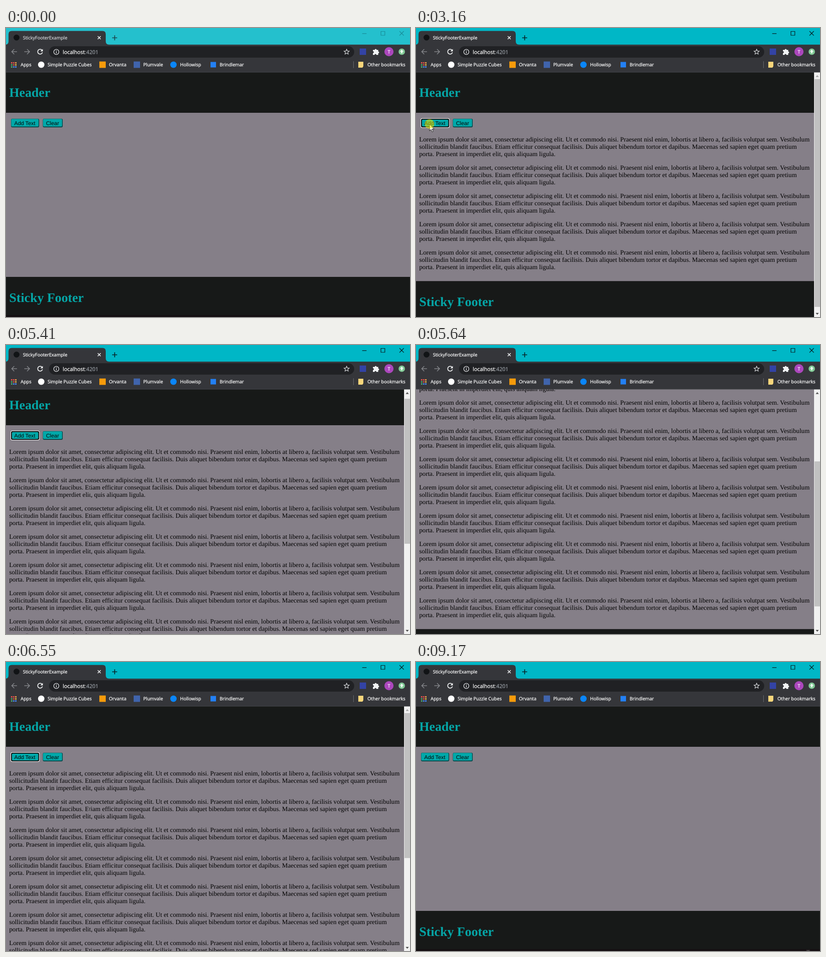
Write an HTML page that moves like this. It is 883 by 634 pixels and loops after 9.26 s.

```html
<!DOCTYPE html>
<html lang="en">
<head>
<meta charset="utf-8">
<title>Sticky footer demo</title>
<style>
  html, body { margin: 0; width: 100%; height: 100%; overflow: hidden; background: #171918; }
  svg { display: block; width: 883px; height: 634px; }
  text { text-rendering: geometricPrecision; white-space: pre; }
  .ui { font-family: "Open Sans", "Noto Sans", sans-serif; font-size: 10.1px; color: #fff; }
  .ui, .ui tspan { fill: currentColor; stroke: currentColor; stroke-width: .25; }
  .body { font: 14.2px "Liberation Serif", "Times New Roman", serif; fill: #000; }
  .title { font: bold 28.35px "Liberation Serif", "Times New Roman", serif; fill: #05a5a6; }
  .label { font: 11.9px "Liberation Sans", Arial, sans-serif; fill: #060909; }
  .line { fill: none; stroke-width: 1.6; }
</style>
</head>
<body>
<svg viewBox="0 0 883 634">
  <defs>
    <clipPath id="view"><rect y="97" width="883" height="537"/></clipPath>
    <g id="para" class="body">
      <text x="7" y="249">Lorem ipsum dolor sit amet, consectetur adipiscing elit. Ut et commodo nisi. Praesent nisl enim, lobortis at libero a, facilisis volutpat sem. Vestibulum</text>
      <text x="7" y="265">sollicitudin blandit faucibus. Etiam efficitur consequat facilisis. Duis aliquet bibendum tortor et dapibus. Maecenas sed sapien eget quam pretium</text>
      <text x="7" y="281">porta. Praesent in imperdiet elit, quis aliquam ligula.</text>
    </g>
  </defs>

  <g clip-path="url(#view)">
    <rect y="97" width="883" height="537" fill="#150f12"/>
    <g id="page">
      <rect y="97" width="883" height="89" fill="#171918"/>
      <text class="title" x="7" y="151">Header</text>
      <rect id="main" y="186" width="883" fill="#857f88"/>
      <g id="buttons"></g>
      <g id="paras"></g>
      <g id="footer">
        <rect width="883" height="84" fill="#171918"/>
        <text class="title" x="7" y="54.5">Sticky Footer</text>
      </g>
    </g>
    <g id="scrollbar">
      <rect x="870" y="97" width="13" height="537" fill="#f1f1f1"/>
      <rect id="thumb" x="871" width="12" fill="#c1c1c1"/>
      <path id="up" d="M873.5 107.5l3.5-4 3.5 4z"/>
      <path id="down" d="M873.5 625l3.5 4 3.5-4z"/>
    </g>
  </g>

  <rect id="titlebar" width="883" height="37"/>
  <path id="controls" fill="none" stroke-width="1.2" d="M778.5 12.3h9.500M819.5 7.500h8.500v8.500h-8.500zM860 7l9.500 9.500M869.500 7l-9.500 9.500"/>
  <path id="plus" class="line" d="M232 21.5h11M237.5 16v11"/>
  <path d="M0 36.500Q5.500 36 5.500 29V13.500Q5.500 6.500 12.500 6.500H211Q218 6.500 218 13.500V29Q218 36 224 36.500V97H0z" fill="#35363a"/>
  <rect y="36.500" width="883" height="60.500" fill="#35363a"/>
  <rect y="96.500" width="883" height="1" fill="#47484c"/>
  <circle cx="23" cy="21" r="6.500" fill="#111416"/>
  <text class="ui" id="tabname" x="37" y="25" style="font-size:10px">StickyFooterExample</text>
  <path class="line" d="M200.500 18l6.500 6.500M207 18l-6.500 6.500" stroke="#f1f3f4"/>

  <g class="line" stroke="#85878b">
    <path d="M24 52H12.500M18 46.500L12.500 52L18 57.500"/>
    <path d="M40 52h11.500M46 46.500l5.500 5.500l-5.500 5.500"/>
  </g>
  <path class="line" d="M79 49A5.300 5.300 0 1 0 79.700 53.500" stroke="#f1f3f4" style="stroke-width:1.8"/>
  <path d="M80.500 46v5.300h-5.300z" fill="#f1f3f4"/>
  <rect x="94" y="40" width="667" height="25" rx="12.500" fill="#202124"/>
  <circle class="line" cx="110" cy="52.500" r="5.600" stroke="#e8eaed" style="stroke-width:1.300"/>
  <path d="M110 51.500v4M110 49v1.400" stroke="#e8eaed" stroke-width="1.400"/>
  <text class="ui" x="124" y="56.500" style="font-size:11.57px">localhost<tspan style="color:#9aa0a6">:4201</tspan></text>
  <path id="star" class="line" stroke="#d2d4d7" style="stroke-width:1.200"/>
  <rect x="773" y="45" width="14" height="14" fill="#3343a5"/>
  <path d="M802 48h4a2 2 0 1 1 4 0h3.500v3.500a2 2 0 1 1 0 4V59h-4a2 2 0 0 0-4 0H802v-4a2 2 0 0 0 0-4z" fill="#f1f3f4"/>
  <circle cx="837" cy="52" r="10" fill="#ab47bc"/>
  <text class="ui" x="837" y="55.500" text-anchor="middle">T</text>
  <circle cx="865" cy="52" r="7" fill="#81c995"/>
  <path d="M865 47.500l4 4.500h-2.500v3.500h-3V52H861z" fill="#f4fff7"/>

  <g id="apps"></g>
  <circle cx="77" cy="80.500" r="7" fill="#fff"/>
  <rect x="204" y="73.500" width="14" height="14" fill="#f79b0b"/>
  <rect x="279" y="73.500" width="14" height="14" fill="#4064ac"/>
  <circle cx="366" cy="80.500" r="7" fill="#0a86fb"/>
  <rect x="447" y="74.500" width="12" height="12" fill="#2380f5"/>
  <g id="bookmarks" class="ui"></g>
  <rect x="759" y="73" width="1" height="15" fill="#6b6d71"/>
  <path d="M770 74h11v10l-2 3h-9z" fill="#f8d67b"/>

  <path id="arrow" d="M0 0V14.500L3.400 11.400L5.800 17L8 16L5.700 10.600H10.200z" fill="#fff" stroke="#111" stroke-width=".9"/>
  <circle id="halo" cy="210.500" r="10.500" fill="#e6dc00" fill-opacity=".58"/>
  <path id="beam" d="M-4 .5H4M0 .5V15.500M-4 15.500H4" stroke="#fff" stroke-opacity=".35" style="mix-blend-mode:difference"/>
</svg>

<script>
const LOOP = 9260, MAX_PARAS = 10;
const $ = id => document.getElementById(id);
const set = (el, attrs) => { for (const k in attrs) el.setAttribute(k, attrs[k]); };
const show = (el, on) => { el.style.display = on ? '' : 'none'; };

function add(parent, tag, attrs, text) {
  const el = document.createElementNS('http://www.w3.org/2000/svg', tag);
  set(el, attrs);
  if (text) el.textContent = text;
  parent.appendChild(el);
  return el;
}

// Static parts
[['Apps', 32], ['Simple Puzzle Cubes', 91], ['Orvanta', 225], ['Plumvale', 300],
 ['Hollowisp', 380.5], ['Brindlemar', 467], ['Other bookmarks', 790]]
  .forEach(([name, x]) => add($('bookmarks'), 'text', { x, y: 84 }, name));

['#e8504a', '#e8504a', '#f0a04b', '#4bae6b', '#e8504a', '#f0c04b', '#4bae6b', '#4a8af4', '#4a8af4']
  .forEach((fill, i) => add($('apps'), 'rect',
    { x: 11 + i % 3 * 4.5, y: 75 + Math.floor(i / 3) * 4.5, width: 3, height: 3, fill }));

set($('star'), { d: 'M' + Array.from({ length: 10 }, (_, i) => {
  const r = i % 2 ? 2.7 : 6, a = i * Math.PI / 5;
  return `${744.5 + r * Math.sin(a)} ${52.5 - r * Math.cos(a)}`;
}).join('L') + 'z' });

function makeButton(x, width, label) {
  const g = add($('buttons'), 'g', {});
  const ring = add(g, 'rect', { x: x - 1, y: 198, width: width + 3, height: 21, rx: 3.5, fill: '#fff' });
  const edge = add(g, 'rect', { x, y: 199, width: width + 1, height: 19, rx: 3 });
  const face = add(g, 'rect', { rx: 2, fill: '#00a8a9' });
  add(g, 'text', { class: 'label', x: x + 7, y: 212.7 }, label);
  return (focused, pressed) => {
    show(ring, focused);
    set(edge, { fill: focused ? '#080c0c' : '#07494b' });
    const inset = focused || pressed;
    set(face, inset
      ? { x: x + 2, y: 201, width: width - 3, height: 15 }
      : { x: x + .5, y: 199.5, width: width - 1, height: 16.5 });
  };
}
const drawAdd = makeButton(11, 60.5, 'Add Text');
const drawClear = makeButton(80.5, 42.5, 'Clear');

const paras = Array.from({ length: MAX_PARAS }, (_, i) =>
  add($('paras'), 'use', { href: '#para', y: 62 * i }));

// Timeline: [press, release] for every click
const addClicks = [[1290, 1370], [1610, 1690], [2000, 2080], [2380, 2550], [2760, 2840],
  [3160, 3310], [3540, 3710], [4010, 4090], [4400, 4550], [4780, 4860]];
const clearClick = [7460, 7620];
const during = (t, [from, to]) => t >= from && t < to;

// Scroll offset held from each time on
const scrolls = [[0, 0], [5400, 10], [5480, 59], [5560, 150], [5640, 242], [5700, 282], [5780, 305],
  [5860, 315], [6090, 298], [6170, 262], [6240, 230], [6320, 209], [6400, 120], [6470, 40], [6550, 0]];

// Pointer moves: start, end, number of jumps, points passed
const moves = [
  [100, 900, 11, [[104, 594], [86, 470], [60, 345], [30, 255], [14, 218], [28, 201]]],
  [1050, 1140, 2, [[28, 201], [28.5, 206], [29.5, 211]]],
  [5090, 5400, 5, [[29.5, 211], [90, 262], [160, 305], [183, 311]]],
  [6700, 7390, 10, [[183, 311], [160, 285], [120, 235], [100, 210]]],
  [7700, 8010, 5, [[100, 210], [260, 330], [450, 455], [567, 504]]],
  [9170, 9170, 1, [[857, 632], [857, 632]]],
];

function pointer(t) {
  const move = moves.filter(m => t >= m[0]).pop();
  if (!move) return null;
  const [start, end, jumps, points] = move;
  const gap = (end - start) / (jumps - 1) || 1;
  const step = Math.min(jumps, Math.floor((t - start) / gap + .01) + 1);
  const first = move === moves[0] ? 1 : 0;
  const u = (step - first) / (jumps - first) * (points.length - 1);
  const i = Math.min(points.length - 2, Math.floor(u)), f = u - i;
  return [0, 1].map(k => points[i][k] + (points[i + 1][k] - points[i][k]) * f);
}

function render(t) {
  const cleared = t >= clearClick[1];
  const count = cleared ? 0 : addClicks.filter(c => t >= c[1]).length;
  const scroll = scrolls.filter(s => t >= s[0]).pop()[1];
  const active = t >= addClicks[0][0];

  set($('titlebar'), { fill: active ? '#00b7c6' : '#24c0cd' });
  set($('controls'), { stroke: active ? '#071c20' : '#198c98' });
  set($('plus'), { stroke: active ? '#071c20' : '#1c3f46' });
  $('tabname').style.color = active ? '#fff' : '#d3d5d8';

  const footerTop = Math.max(546, 245.5 + 62 * count);
  const docHeight = footerTop - 97 + 84;
  set($('page'), { transform: `translate(0 ${-scroll})` });
  set($('main'), { height: footerTop - 186 });
  set($('footer'), { transform: `translate(0 ${footerTop})` });
  paras.forEach((p, i) => show(p, i < count));

  const overflow = docHeight - 537;
  show($('scrollbar'), overflow > 0);
  if (overflow > 0) {
    const size = 505 * 537 / docHeight;
    set($('thumb'), { y: 112 + (505 - size) * Math.min(1, scroll / overflow), height: size });
    set($('up'), { fill: scroll > 0 ? '#505050' : '#a3a3a3' });
    set($('down'), { fill: scroll < overflow - 1 ? '#505050' : '#a3a3a3' });
  }

  const adding = addClicks.some(c => during(t, c)), clearing = during(t, clearClick);
  drawAdd(during(t, [addClicks[0][0], clearClick[0]]), adding);
  drawClear(during(t, [clearClick[0], 9170]), clearing);
  show($('halo'), adding || clearing);
  set($('halo'), { cx: clearing ? 100 : 29.5 });

  const at = pointer(t);
  const overText = at && (count > 0 && at[1] > 236 || t >= 9170);
  show($('arrow'), at && !overText);
  show($('beam'), overText);
  if (at) set(overText ? $('beam') : $('arrow'), { transform: `translate(${at[0]} ${at[1]})` });
}

const begin = performance.now();
function tick() {
  render((performance.now() - begin) % LOOP);
  requestAnimationFrame(tick);
}
tick();
</script>
</body>
</html>
```
